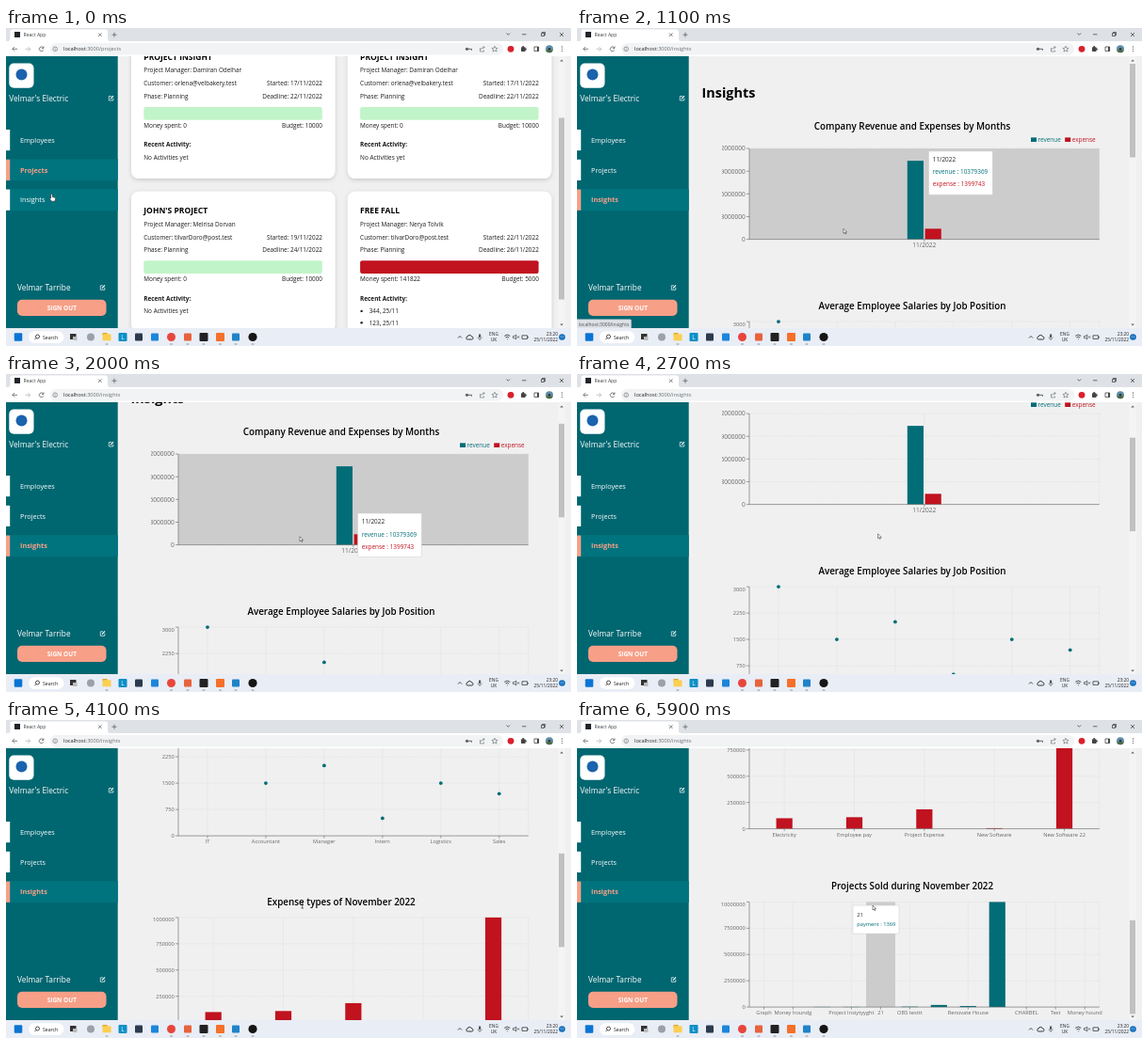
Recreate the animation shown at these times as an HTML page. Size 600 by 338 pixels, loop 6000 ms.

```html
<!DOCTYPE html>
<html lang="en">
<head>
<meta charset="utf-8">
<title>Dashboard</title>
<style>
html, body { margin: 0; width: 100%; height: 100%; overflow: hidden; background: #f0f0f0; }
svg { display: block; width: 100vw; height: 100vh; font-family: "Open Sans", "Noto Sans", sans-serif; }
text { white-space: pre; }
</style>
</head>
<body>
<script>
const TEAL = '#006d77', RED = '#c1121f', SALMON = '#f79f87', GREY = '#666';

// ---- drawing helpers ----
const text = (x, y, s, size = 6.4, fill = '#1a1a1a', anchor = 'start', weight = 400) =>
  `<text x="${x}" y="${y}" font-size="${size}" fill="${fill}" text-anchor="${anchor}" font-weight="${weight}">${s}</text>`;
const rect = (x, y, w, h, fill, r = 0, more = '') =>
  `<rect x="${x}" y="${y}" width="${w}" height="${h}" fill="${fill}" rx="${r}" ${more}/>`;
const dot = (x, y, r, fill) => `<circle cx="${x}" cy="${y}" r="${r}" fill="${fill}"/>`;
const line = (d, stroke = '#444', w = 0.8, more = '') =>
  `<path d="${d}" fill="none" stroke="${stroke}" stroke-width="${w}" ${more}/>`;
const group = (id, body, more = '') => `<g id="${id}" ${more}>${body}</g>`;

// ---- browser window ----
function browser() {
  const icon = '#5f6368';
  return rect(0, 0, 600, 14, '#dee1e6') + rect(0, 14, 600, 16, '#fff') +
    '<path d="M2 14Q4.500 14 4.500 11V4Q4.500 1.500 7 1.500H105Q108 1.500 108 4V11Q108 14 110 14Z" fill="#fff"/>' +
    rect(9, 4, 6, 6, '#20232a') + text(18.5, 9.2, 'React App', 5.1, '#3c4043') +
    line('M98 5.500l3.500 3.500m0 -3.500l-3.500 3.500M112.500 7.200h5m-2.500 -2.500v5', icon) +
    line('M531.500 5.500l1.800 1.800l1.800 -1.800M548 6.800h4.500M568.500 5.500h3v3h-3zM569.500 5.500v-1h3v3h-1M588 5l4 4m0 -4l-4 4', '#333', 0.7) +
    line('M12 22.300H6.800m2.300 -2.300l-2.300 2.300l2.300 2.300', icon) +
    line('M20.500 22.300h5.200m-2.300 -2.300l2.300 2.300l-2.300 2.300', '#b4b7bb') +
    line('M39.700 21a2.400 2.400 0 1 0 .2 2.300M40 19.500v2h-2', icon) +
    rect(47, 16, 481, 12.6, '#f1f3f4', 6.3) +
    line('M54.500 22.300a2.300 2.300 0 1 0 -4.600 0a2.300 2.300 0 1 0 4.600 0M52.200 22v1.500M52.200 20.700v.6', icon, 0.6) +
    dot(489.5, 22.3, 1.6, icon) + line('M490 22.300h4.500v1.500', icon, 1) +
    line('M503.500 21v4h4v-1.500M504.500 23q.5 -2.500 3.500 -2.500m-1.300 -1.500l1.500 1.500l-1.500 1.500', icon, 0.6) +
    line('M519 19.300l.9 2l2.200 .2l-1.700 1.400l.6 2.200l-2 -1.200l-2 1.200l.6 -2.200l-1.700 -1.400l2.200 -.2z', icon, 0.6) +
    dot(536, 22.3, 3.4, '#d8202c') +
    rect(547, 20.3, 4.6, 4.6, '#444', 0.6) + dot(549.2, 20, 1, '#444') + dot(551.9, 22.5, 1, '#444') +
    line('M561 20h4.600v4.600h-4.600z', '#444') + rect(564, 20, 1.8, 4.6, '#444') +
    dot(577, 22.3, 4, '#5d8fa8') + `<path d="M573.200 23.400a4 4 0 0 0 7.600 0z" fill="#4a6a3a"/>` + dot(577, 22.3, 1.4, '#38362f') +
    [20, 22.3, 24.6].map(y => dot(590.5, y, 0.65, icon)).join('');
}

const address = page => text(61, 24.4,
  `localhost<tspan fill="#6a6e73">:3000/${page}</tspan>`, 5.65, '#202124');

// ---- left menu ----
const pencil = (x, y) => line(`M${x + 3} ${y + 0.8}h-2.700v4.500h4.500v-2.500`, '#fff', 0.7) +
  line(`M${x + 2} ${y + 3.600}l3 -3.200`, '#fff', 1.1);

const menu = (active, hover) => ['Employees', 'Projects', 'Insights'].map((name, i) => {
  const y = 108 + i * 31.8, on = i === active;
  return (on || i === hover ? rect(0, y - 0.5, 118.7, 23, '#00747e') : '') +
    rect(0, y, 4.2, 22.2, on ? SALMON : '#fff') +
    text(15, y + 13.8, name, 7.3, on ? SALMON : '#fff', 'start', on ? 700 : 400);
}).join('');

function sidebar() {
  return rect(0, 30, 118.7, 289, '#006670') +
    rect(3.3, 37.5, 26.2, 26.2, '#fff', 5) + dot(16.5, 49.5, 6, '#1a63ad') +
    text(3.2, 77.8, "Velmar's Electric", 8.3, '#fff') + pencil(109, 71.7) +
    text(12, 279, 'Velmar Tarribe', 8.3, '#fff') + pencil(100, 273) +
    rect(12, 288.8, 94.5, 17.2, SALMON, 5) + text(59.3, 299.8, 'SIGN OUT', 6.5, '#fff', 'middle', 700);
}

// ---- projects page ----
function card(x, y, p) {
  const l = x + 13.3, r = x + 203, t = (dy, a, b = '', w = 400) =>
    text(l, y + dy, a, 6.4, '#1a1a1a', 'start', w) + text(r, y + dy, b, 6.4, '#1a1a1a', 'end');
  return rect(x, y, 216.5, 149.5 + (p.log ? 30 : 0), '#fff', 8, 'filter="url(#shade)"') +
    text(l, y + 23.2, p.name, 8.5, '#000', 'start', 700) +
    t(36.9, 'Project Manager: ' + p.boss) +
    t(50.8, 'Customer: ' + p.mail, 'Started: ' + p.from) +
    t(64.5, 'Phase: Planning', 'Deadline: ' + p.to) +
    rect(l, y + 73.6, 189.5, 13.6, p.log ? RED : '#c1f4c9', 2) +
    t(95, 'Money spent: ' + (p.spent || 0), 'Budget: ' + p.budget) +
    t(115.8, 'Recent Activity:', '', 700) +
    (p.log ? p.log.map((s, i) => dot(l + 1.5, y + 127.2 + i * 12.4, 1.2, '#222') +
      text(l + 9.6, y + 129.4 + i * 12.4, s)).join('') : t(129.5, 'No Activities yet'));
}

function projects() {
  const first = { name: 'PROJECT INSIGHT', boss: 'Damiran Odelhar', mail: 'orlena@velbakery.test',
    from: '17/11/2022', to: '22/11/2022', budget: 10000 };
  return card(133, 10.5, first) + card(362.8, 10.5, first) +
    card(133, 173.7, { name: "JOHN'S PROJECT", boss: 'Melrisa Dorvan', mail: 'tilvarDoro@post.test',
      from: '19/11/2022', to: '24/11/2022', budget: 10000 }) +
    card(362.8, 173.7, { name: 'FREE FALL', boss: 'Nerya Tolvik', mail: 'tilvarDoro@post.test',
      from: '22/11/2022', to: '26/11/2022', budget: 5000, spent: 141822, log: ['344, 25/11', '123, 25/11'] });
}

// ---- insights page ----
const L = 183, R = 554.7;
const title = (y, s) => text(356, y, s, 9.85, '#000', 'middle', 600);

function chart(top, base, max, labels, marks, size = 5.7, drop = 2.5) {
  const h = base - top, band = (R - L) / labels.length;
  const mid = i => L + band * (i + 0.5), at = v => base - v / max * h;
  let grid = `M${R} ${top}V${base}`, ticks = '', words = '';
  for (let i = 0; i < 5; i++) {
    const y = base - i * h / 4;
    grid += `M${L} ${y}H${R}`;
    ticks += `M${L - 3} ${y}h3`;
    words += text(178.8, y + size * 0.36 + (i === 4 ? drop : 0), max * i / 4, size, GREY, 'end');
  }
  labels.forEach((s, i) => {
    if (!s) return;
    grid += `M${mid(i)} ${top}V${base}`;
    ticks += `M${mid(i)} ${base}v2.500`;
    words += text(mid(i), base + 8, s, size, GREY, 'middle');
  });
  return line(grid, '#d9d9d9', 0.5, 'stroke-dasharray="1.5 .8"') + marks(mid, at, base) +
    line(`M${L} ${top}V${base}H${R}` + ticks, GREY, 0.6) + words;
}

const bar = (x, y, base, fill, w = 17.2) => rect(x, y, w, base - y, fill);
const bars = (values, fill) => (mid, at, base) =>
  values.map((v, i) => v ? bar(mid(i) - 8.6, at(v), base, fill) : '').join('');

function tip(x, y, w, h, rows, size, gap, first) {
  return rect(x, y, w, h, '#fff', 0.5, 'stroke="#ccc" stroke-width=".5"') +
    rows.map(([s, fill], i) => text(x + 4.3, y + first + i * gap, s, size, fill)).join('');
}

function insights() {
  return text(132.6, 73.2, 'Insights', 14.4, '#000', 'start', 700) +
    title(107.3, 'Company Revenue and Expenses by Months') +
    rect(482, 115.8, 6, 4.6, TEAL) + text(489.6, 120, 'revenue', 6.4, TEAL) +
    rect(518.2, 115.8, 6, 4.6, RED) + text(525.8, 120, 'expense', 6.4, RED) +
    chart(127.5, 224, 12000000, ['11/2022'], (mid, at, base) =>
      group('shade1', rect(L, 127.5, R - L, 96.5, '#ccc')) +
      group('grow', bar(350.8, at(10379369), base, TEAL) + bar(369.6, at(1399743), base, RED)), 6.6, 0) +
    rect(119, 122, 35, 110, '#f0f0f0') +

    title(298.4, 'Average Employee Salaries by Job Position') +
    chart(311.5, 423.5, 3000, ['IT', 'Accountant', 'Manager', 'Intern', 'Logistics', 'Sales'], (mid, at) =>
      [3000, 1500, 2000, 500, 1500, 1200].map((v, i) => dot(mid(i), at(v), 1.9, TEAL)).join('')) +

    title(497, 'Expense types of November 2022') +
    chart(510.3, 622, 1000000,
      ['Electricity', 'Employee pay', 'Project Expense', 'New Software', 'New Software 22'],
      bars([100000, 110000, 185000, 6000, 1000000], RED)) +

    title(686.8, 'Projects Sold during November 2022') +
    chart(699.8, 811.5, 10000000,
      ['Graph', 'Money houndg', '', 'Project Insiytyyght', '21', 'OBS testtt', '', 'Renovate House', '',
        'CHARBEL', 'Test', 'Money hound'],
      (...m) => group('shade2', rect(307, 699.8, 31, 111.7, '#ccc')) +
        bars([0, 0, 20000, 20000, 1369, 40000, 200000, 100000, 10000000], TEAL)(...m)) +

    group('tip1', tip(373.5, 0, 67.8, 46.3, [['11/2022', '#222'], ['revenue : 10379369', TEAL],
      ['expense : 1399743', RED]], 6.4, 13.1, 11.4)) +
    group('tip2', tip(293, 703.5, 49, 30, [['21', '#222'], ['payment : 1369', TEAL]], 5.7, 10.2, 11.5));
}

// ---- taskbar ----
function taskbar() {
  const y = 328.5, sq = (x, c, s = 8) => rect(x - s / 2, y - s / 2, s, s, c, 1);
  return rect(0, 319, 600, 19, '#e9edf5') + sq(13, '#0a74d4', 8.5) +
    rect(24, 322.3, 37.5, 12.6, '#fff', 6.3) +
    line('M35.500 328a2 2 0 1 0 -4 0a2 2 0 1 0 4 0M32 329.500l-1.500 1.700', '#222') + text(39, 330.6, 'Search', 5.1) +
    rect(68, 325, 6.5, 6, '#333') + rect(71, 328, 4.5, 4, '#bbb') +
    dot(90, y, 4, '#9aa1a8') +
    rect(102.5, 324, 5, 3, '#e0a526', 0.6) + rect(102.5, 325.2, 9, 7, '#fbcf50', 0.6) +
    sq(124, '#0b8fc6', 9) + text(124, 330.8, 'L', 6.4, '#fff', 'middle') +
    sq(141, '#2b3a4d') + sq(158, '#1b86dc') + dot(175.5, y, 4.5, '#e8453c') + sq(193, '#e8623c') +
    sq(210, '#222', 9) + sq(227.5, '#f5702a', 9) + sq(244, '#1f83c9') + dot(262, y, 4.6, '#161616') +
    [107, 175.5, 193, 210, 227.5, 244, 262].map(x => rect(x - 1.5, 335.6, 3, 0.9, '#8a8f96', 0.4)).join('') +
    line('M480 329.500l2 -2l2 2', '#222') +
    line('M490.500 331h4a1.500 1.500 0 0 0 0 -3a2.300 2.300 0 0 0 -4.400 0a1.500 1.500 0 0 0 .4 3z', '#222', 0.9) +
    rect(502, 325.3, 2.2, 4, '#555', 1.1) + line('M501 328.500a2.100 2.100 0 0 0 4.200 0M503.100 330.600v1.400', '#555', 0.6) +
    text(518, 327, 'ENG', 4.8, '#222', 'middle') + text(518, 333.3, 'UK', 4.8, '#222', 'middle') +
    line('M529.300 327.300q3 -2.500 6 0M530.500 329q1.800 -1.500 3.600 0M532 330.800h.7', '#222', 0.8) +
    line('M538.500 327.500h1.500l1.700 -1.500v5l-1.700 -1.500h-1.500zM543 327.500l2 2m0 -2l-2 2', '#222', 0.6) +
    line('M548 326.800h5.600v3.600h-5.600zM554.400 328v1.300', '#222', 0.7) +
    text(586, 327, '23:20', 4.8, '#222', 'end') + text(586, 333.3, '25/11/2022', 4.8, '#222', 'end') +
    dot(590.5, y, 3.3, '#0f6cbd') + text(590.5, 330, '11', 3.8, '#fff', 'middle');
}

const pointers =
  group('hand', '<path d="M-1-4.500q1-.8 1.500 .3l.4 2.800l2.600 .7q.8 .4.600 1.300l-.6 2.600h-3.600l-2-2.700q0-1 1.200-.4z" fill="#fff" stroke="#222" stroke-width=".6"/>') +
  group('arrow', '<path d="M0 0V5L1.200 4L2 5.700L2.800 5.300L2 3.700H3.600z" fill="#fff" stroke="#222" stroke-width=".5"/>') +
  group('beam', line('M-1.300-3h2.600M-1.300 3h2.600M0-3V3', '#333', 0.7));

document.body.insertAdjacentHTML('afterbegin', `<svg viewBox="0 0 600 338">
  <defs>
    <clipPath id="view"><rect x="118" y="30" width="482" height="289"/></clipPath>
    <filter id="shade" x="-10%" y="-10%" width="120%" height="120%">
      <feDropShadow dx="0" dy="1.500" stdDeviation="2" flood-opacity=".17"/></filter>
  </defs>
  ${rect(0, 30, 600, 289, '#f0f0f0')}
  <g clip-path="url(#view)">${group('old', projects())}${group('page', insights())}</g>
  ${rect(586.5, 30, 7.2, 289, '#f4f4f4')}
  ${rect(587, 38, 6, 100, '#c1c1c1', 0, 'id="thumb"')}
  <path d="M588.300 35.500l1.800-2l1.800 2zM588.300 314.500l1.800 2l1.800-2z" fill="#666"/>
  ${sidebar()}${group('menuA', menu(1, 2))}${group('menuB', menu(2))}
  ${browser()}${group('urlA', address('projects'))}${group('urlB', address('insights'))}
  ${group('status', rect(-1, 309.8, 58.5, 10, '#dee1e6', 1, 'stroke="#c4c7cb" stroke-width=".5"') +
    text(1.8, 316.6, 'localhost:3000/insights', 5, '#4a4d51'))}
  ${taskbar()}${group('pointer', pointers)}
</svg>`);

// ---- motion ----
const $ = id => document.getElementById(id);
const show = (id, on) => $(id).setAttribute('display', on ? 'inline' : 'none');
const move = (id, x, y) => $(id).setAttribute('transform', `translate(${x} ${y})`);

// Linear interpolation through [time, value] stops.
function track(t, stops) {
  let [t0, v0] = stops[0];
  for (const [t1, v1] of stops) {
    if (t < t1) return v0 + (v1 - v0) * Math.max(0, (t - t0) / (t1 - t0));
    [t0, v0] = [t1, v1];
  }
  return v0;
}

const NOTCH = 43, END = 507, OFFSET = 0.6;
const scrollStops = [[1400, 0], [2000, NOTCH], [2200, NOTCH], [2700, 2 * NOTCH], [4100, 7 * NOTCH],
  [4600, 11 * NOTCH], [4700, 11 * NOTCH], [5000, END]];
const xStops = [[600, 48.5], [1000, 283], [1400, 283], [2000, 312], [2700, 319.6], [4100, 314.7], [5900, 314]];
const yStops = [[600, 181], [1000, 213.3], [1400, 213.3], [2000, 172.8], [2700, 169.8], [4100, 197], [5900, 197]];

function draw(t) {
  const before = t < 700, scroll = track(t, scrollStops);
  const hover1 = t >= 1000 && t <= 2000, hover2 = t >= 5900;
  for (const id of ['old', 'menuA', 'urlA', 'hand']) show(id, before);
  for (const id of ['page', 'menuB', 'urlB']) show(id, !before);
  show('status', t >= 100 && t < 1500);
  for (const id of ['shade1', 'tip1']) show(id, hover1);
  for (const id of ['shade2', 'tip2']) show(id, hover2);

  const beam = t >= 3900 && !hover2;
  show('beam', beam);
  show('arrow', !before && !beam);
  move('pointer', track(t, xStops), track(t, yStops));

  move('page', 0, OFFSET - scroll);
  move('tip1', 0, track(t, [[1400, 130.3], [2000, 190.5]]));
  const k = track(t, [[600, 0], [1000, 1]]);
  $('grow').setAttribute('transform', `translate(0 ${224 * (1 - k)}) scale(1 ${k})`);

  $('thumb').setAttribute('y', before ? 95.5 : 38 + scroll * 0.345);
  $('thumb').setAttribute('height', before ? 193 : 99.5);
}

const start = performance.now();
function frame() {
  draw(Math.floor((performance.now() - start) % 6000 / 100) * 100);
  requestAnimationFrame(frame);
}
frame();
</script>
</body>
</html>
```
